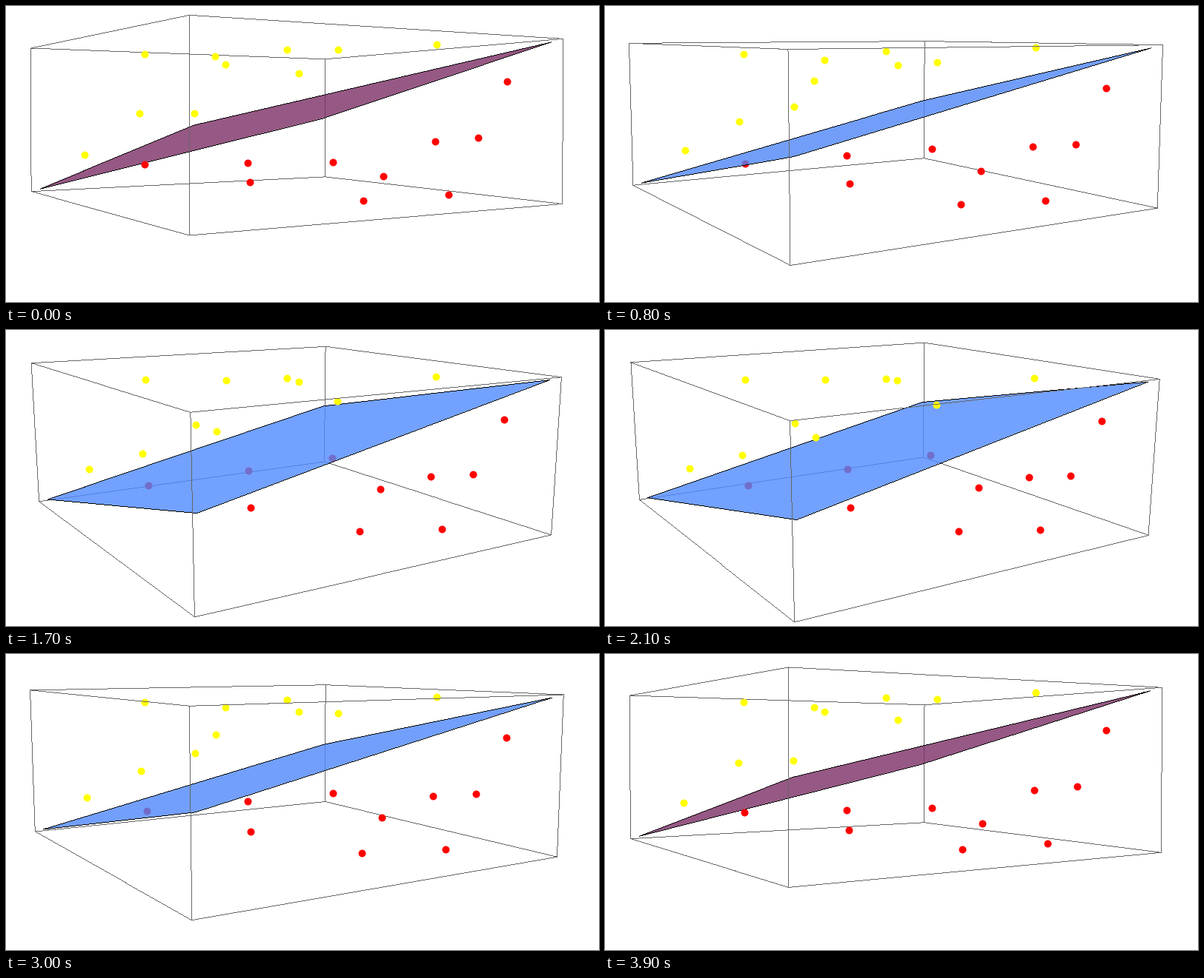
A matplotlib script that plays this animation: 800x400 px, repeating every 4 s.

```python
from itertools import combinations, product

import matplotlib.pyplot as plt
import numpy as np
from matplotlib.animation import FuncAnimation
from matplotlib.patches import Polygon

W, H, DPI = 800, 400, 100
FRAMES, INTERVAL = 40, 100
DOT_SIZE = 10 * 72 / DPI

# Camera: fixed plan position, the height rises and falls
EYE_X, EYE_Y = 1.926, -1.197
EYE_LOW, EYE_STEP = 0.0288, 0.0253
FOCAL = 1175.4
CENTRE = np.array([366.0, 154.9])

# Data spans -10..10, the box adds a small margin; its sides are 1 : 1 : 0.4
BOX = 10.4
SCALE = np.array([1, 1, 0.4]) / (2 * BOX)

OPACITY = 0.8
UNDERSIDE = np.array([150, 88, 132])
TOP_DIM = np.array([114, 156, 246])
TOP_LIT = np.array([114, 161, 255])


def cloud(*keys):
    """Key points plus the midpoints along the closed path through them."""
    keys = np.array(keys)
    return np.vstack([keys, (keys + np.roll(keys, -1, axis=0)) / 2])


YELLOW = cloud((-8, -8, -5), (8, -8, 7), (6, 6, 10), (-4, -6, 9), (-4, 4, 7))
RED = cloud((-4, -6, -6), (-6, 8, -7), (8, 5, -9), (9, 8, 5), (5, 2, -10))

PLANE = np.array([(x, y, (x + y) / 2)
                  for x, y in ((-10, -10), (10, -10), (10, 10), (-10, 10))])
CORNERS = np.array(list(product((-BOX, BOX), repeat=3)))
EDGES = [(a, b) for a, b in combinations(range(8), 2)
         if np.count_nonzero(CORNERS[a] != CORNERS[b]) == 1]


def touches_back(edge):
    """True for edges that meet the far vertical edge of the box."""
    return any(CORNERS[i][0] < 0 < CORNERS[i][1] for i in edge)


BACK = [e for e in EDGES if touches_back(e)]
FRONT = [e for e in EDGES if not touches_back(e)]
RIM = [(i, (i + 1) % 4) for i in range(4)]


def project(points, eye):
    """Perspective view from eye towards the box centre, in pixels."""
    forward = -eye / np.linalg.norm(eye)
    right = np.cross(forward, (0, 0, 1))
    right /= np.linalg.norm(right)
    up = np.cross(right, forward)
    rel = points * SCALE - eye
    xy = np.column_stack([rel @ right, -(rel @ up)])
    return CENTRE + FOCAL * xy / (rel @ forward)[:, None]


def hairlines(points, edges):
    """Centres of the pixels along each edge, for crisp one-pixel lines."""
    rows = []
    for i, j in edges:
        a, b = points[i], points[j]
        steps = int(np.abs(b - a).max()) + 1
        rows.append(np.floor(np.linspace(a, b, steps + 1)) + 0.5)
    return np.vstack(rows).T


def film(shade):
    """Translucent colour that shows the given shade over white."""
    base = (shade - 255 * (1 - OPACITY)) / (255 * OPACITY)
    return (*np.clip(base, 0, 1), OPACITY)


fig = plt.figure(figsize=(W / DPI, H / DPI), dpi=DPI, facecolor="white")
ax = fig.add_axes([0, 0, 1, 1])
ax.set_xlim(0, W)
ax.set_ylim(H, 0)
ax.axis("off")


def marks(marker, color, zorder=1):
    return ax.plot([], [], marker, color=color, ms=DOT_SIZE, mew=0,
                   antialiased=False, zorder=zorder)[0]


back_lines = marks(",", "0.4", 1)
rim_lines = marks(",", "black", 3.5)
front_lines = marks(",", "0.4", 5)
yellow_dots = marks("o", "#ffff00")
red_dots = marks("o", "#ff0000")
sheet = ax.add_patch(Polygon(np.zeros((4, 2)), lw=0, zorder=3))


def update(n):
    k = min(n, FRAMES - n)
    eye = np.array([EYE_X, EYE_Y, EYE_LOW + EYE_STEP * k])
    above = eye[2] > 0.2 * (EYE_X + EYE_Y)

    corners = project(CORNERS, eye)
    back_lines.set_data(*hairlines(corners, BACK))
    front_lines.set_data(*hairlines(corners, FRONT))

    yellow_dots.set_data(*project(YELLOW, eye).T)
    red_dots.set_data(*project(RED, eye).T)
    yellow_dots.set_zorder(4 if above else 2)
    red_dots.set_zorder(2 if above else 4)

    light = np.clip((k - 5) / 8, 0, 1)
    shade = TOP_DIM + (TOP_LIT - TOP_DIM) * light if above else UNDERSIDE
    outline = project(PLANE, eye)
    sheet.set_xy(outline)
    sheet.set_facecolor(film(shade))
    rim_lines.set_data(*hairlines(outline, RIM))
    return back_lines, front_lines, rim_lines, yellow_dots, red_dots, sheet


anim = FuncAnimation(fig, update, frames=FRAMES, interval=INTERVAL,
                     repeat=True, repeat_delay=0, blit=False)
plt.show()
```
